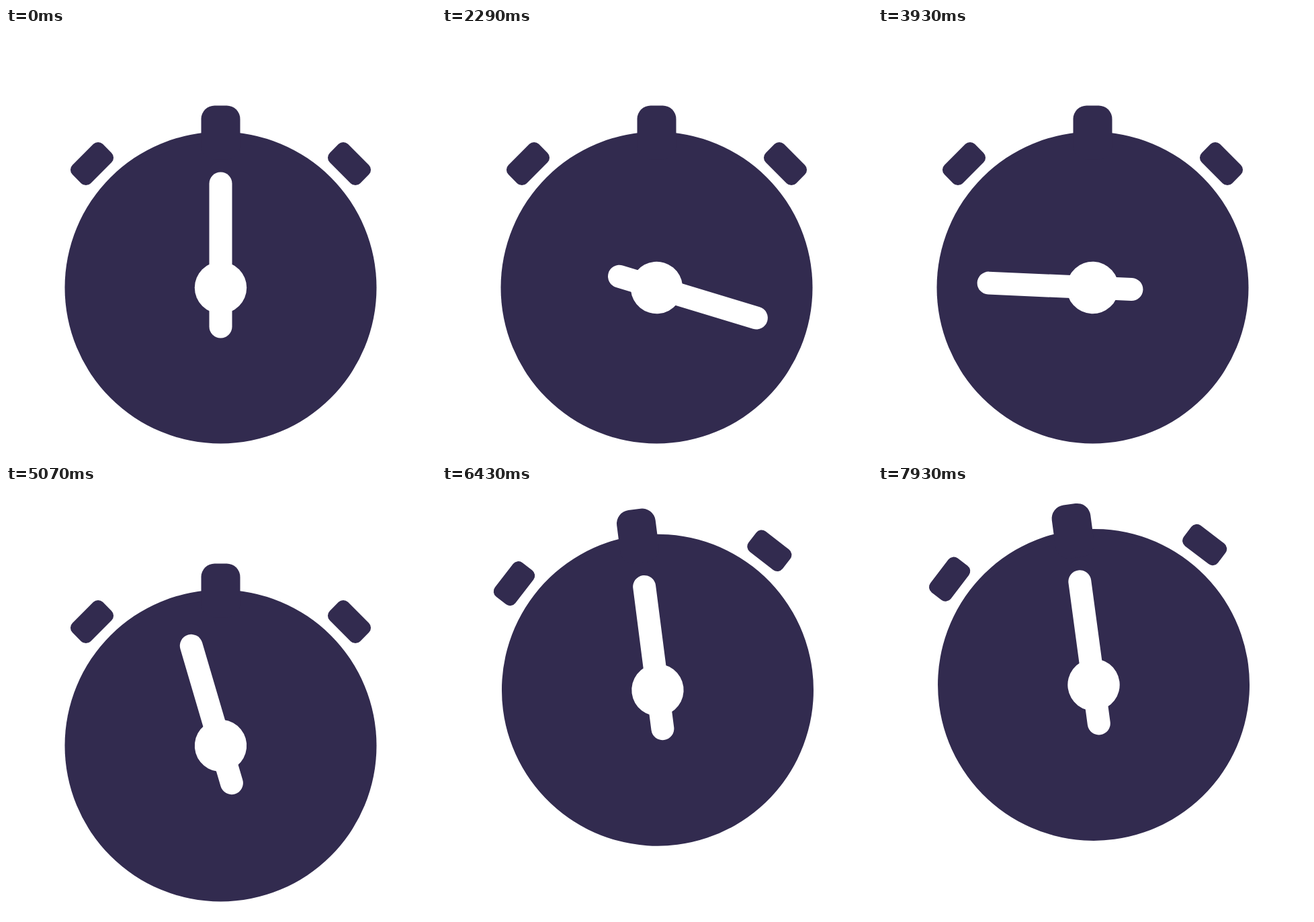
An HTML page that plays this animation: 640x640 px, repeating every 8000 ms.

```html
<!DOCTYPE html>
<html lang="en">
<head>
<meta charset="utf-8">
<title>Stopwatch</title>
<style>
  html, body { margin: 0; width: 100%; height: 100%; overflow: hidden; background: #fff; }
  svg { display: block; width: 100%; height: 100%; }
  .body { fill: #322b4f; }
  .hand { fill: #fff; }
</style>
</head>
<body>
<svg viewBox="0 0 640 640">
  <g id="watch">
    <g class="body">
      <circle cx="319.5" cy="386.5" r="232"/>
      <rect x="290.5" y="115.5" width="58" height="80" rx="20"/>
      <rect x="-32" y="-19.2" width="64" height="38.4" rx="10" transform="translate(128 202) rotate(-45)"/>
      <rect x="-32" y="-19.2" width="64" height="38.4" rx="10" transform="translate(511 202) rotate(45)"/>
    </g>
    <g id="hand" class="hand">
      <rect x="302.5" y="214.5" width="34" height="247" rx="17"/>
      <circle cx="319.5" cy="386.5" r="38.7"/>
    </g>
  </g>
</svg>
<script>
  const LOOP = 8000, FPS = 14, LIFT = 90.5, TILT = 12;
  const SWING = 333.3, FIRST_TILT = 6695;
  const watch = document.getElementById('watch');
  const hand = document.getElementById('hand');

  // Symmetric ease: cubic-bezier(.437, 0, .563, 1)
  function ease(x) {
    if (x <= 0) return 0;
    if (x >= 1) return 1;
    const p = 0.437;
    let lo = 0, hi = 1;
    for (let i = 0; i < 24; i++) {
      const s = (lo + hi) / 2, r = 1 - s;
      const bx = 3 * p * r * r * s + 3 * (1 - p) * r * s * s + s ** 3;
      if (bx < x) lo = s; else hi = s;
    }
    return lo * lo * (3 - 2 * lo);
  }

  const between = (t, start, end) => ease((t - start) / (end - start));

  function tilt(t) {
    if (t < FIRST_TILT) return -TILT * between(t, 6085, FIRST_TILT);
    const swings = (t - FIRST_TILT) / SWING;
    const n = Math.floor(swings);
    const side = n % 2 ? 1 : -1;
    return side * TILT * (1 - 2 * ease(swings - n));
  }

  function draw(t) {
    const lift = LIFT * between(t, 5820, 6590);
    hand.setAttribute('transform', `rotate(${360 * between(t, 0, 6000)} 319.5 386.5)`);
    watch.setAttribute('transform', `translate(0 ${-lift}) rotate(${tilt(t)} 319.5 375)`);
  }

  const start = performance.now();
  function tick() {
    const t = (performance.now() - start) % LOOP;
    // Motion advances in held steps; the small lead absorbs timer jitter.
    const step = Math.floor((t + 18) * FPS / 1000) % (LOOP * FPS / 1000);
    draw(step * 1000 / FPS);
    requestAnimationFrame(tick);
  }
  tick();
</script>
</body>
</html>
```
